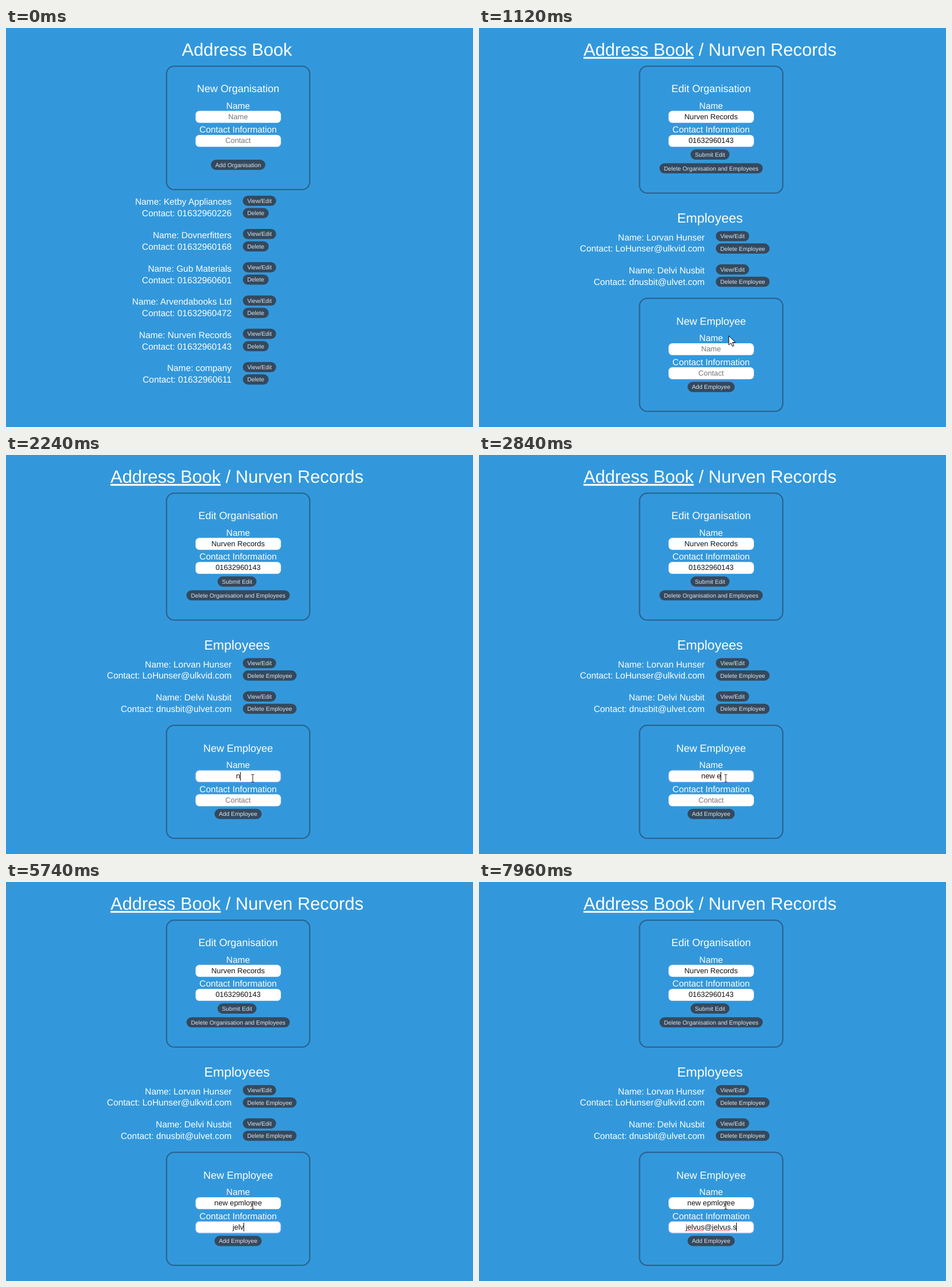
Animation, 810 px wide and 691 px high, one loop 8000 ms. Source, as an HTML page:

```html
<!DOCTYPE html>
<html lang="en">
<head>
<meta charset="utf-8">
<title>Address Book</title>
<style>
  html, body { margin: 0; width: 100%; height: 100%; overflow: hidden; background: #3398db; }
  svg { display: block; }
  text {
    font-family: "Liberation Sans", Arial, sans-serif;
    text-rendering: geometricPrecision;
    white-space: pre;
    fill: #fff;
  }
  .status { font-family: "Open Sans", sans-serif; fill: #a9abae; }
</style>
</head>
<body>
<svg width="810" height="691" viewBox="0 0 810 691">
  <g id="list"></g>
  <g id="detail"></g>
  <g id="live"></g>
  <g id="cursor"></g>
</svg>
<script>
const LOOP = 8000, OPEN = 900, FOCUS_NAME = 1550, FOCUS_CONTACT = 4660;
const MID = 402.6, FORM_Y = 402.3;
const INPUT = 12.8, BODY = 15.36, BUTTON = 10.24;
const $ = id => document.getElementById(id);
const pen = document.createElement('canvas').getContext('2d');

function width(str, size) {
  pen.font = `${size}px "Liberation Sans", Arial, sans-serif`;
  pen.textRendering = 'geometricPrecision';
  return pen.measureText(str).width;
}

const text = (str, x, y, size, anchor = 'middle', fill = '#fff') =>
  `<text x="${x}" y="${y}" font-size="${size}" text-anchor="${anchor}" style="fill:${fill}">${str}</text>`;

// y is the middle of the button
function button(label, x, y) {
  const w = width(label, BUTTON) + 15.36;
  return `<rect x="${x}" y="${y - 8.8}" width="${w}" height="17.6" rx="8.8" fill="#34495e"/>` +
    text(label, x + w / 2, y + 3.6, BUTTON, 'middle', '#dfe3e6');
}

const midButton = (label, x, y) =>
  button(label, x - width(label, BUTTON) / 2 - 7.68, y);

const panel = (top, bottom) =>
  `<rect x="278.4" y="${top + 1.1}" width="248.5" height="${bottom - top - 2.2}" rx="13.5" fill="none" stroke="#2a6594" stroke-width="2.3"/>`;

function field(value, y, fill = '#111', focused = false) {
  const ring = focused ? ' stroke="#79a7f5" stroke-width="1.2"' : '';
  return `<rect x="328.8" y="${y}" width="148" height="20.6" rx="6.5" fill="#fff"${ring}/>` +
    text(value, MID, y + 14, INPUT, 'middle', fill);
}

const labels = (title, y) =>
  text(title, MID, y + 111.3, 17.97) +
  text('Name', MID, y + 139.6, BODY) +
  text('Contact Information', MID, y + 181.2, BODY);

const entry = (name, contact, y, gap, remove) =>
  text('Name: ' + name, 391.3, y, BODY, 'end') +
  text('Contact: ' + contact, 391.3, y + gap, BODY, 'end') +
  button('View/Edit', 410.7, y - 7.2) +
  button(remove, 410.7, y + 14.2);

const companies = [
  ['Ketby Appliances', '01632960226'],
  ['Dovnerfitters', '01632960168'],
  ['Gub Materials', '01632960601'],
  ['Arvendabooks Ltd', '01632960472'],
  ['Nurven Records', '01632960143'],
  ['company', '01632960611']
];
const staff = [
  ['Lorvan Hunser', 'LoHunser@ulkvid.com'],
  ['Delvi Nusbit', 'dnusbit@ulvet.com']
];
const [orgName, orgPhone] = companies[4];

$('list').innerHTML =
  text('Address Book', 400.6, 48.2, 30.72) +
  panel(65, 281) + labels('New Organisation', 0) +
  field('Name', 143.6, '#757575') + field('Contact', 185.2, '#757575') +
  midButton('Add Organisation', MID, 236.9) +
  companies.map(([n, c], i) => entry(n, c, 306.4 + i * 57.6, 20, 'Delete')).join('');

$('detail').innerHTML =
  text(`<tspan text-decoration="underline">Address Book</tspan> / ${orgName}`, 400.6, 48.2, 30.72) +
  panel(65, 287) + labels('Edit Organisation', 0) +
  field(orgName, 143.6) + field(orgPhone, 185.2) +
  midButton('Submit Edit', 400.7, 219.1) +
  midButton('Delete Organisation and Employees', MID, 243) +
  text('Employees', 400.6, 337.2, 23.04) +
  staff.map(([n, c], i) => entry(n, c, 367.7 + i * 57.6, 19.4, 'Delete Employee')).join('') +
  panel(467, 665) + labels('New Employee', FORM_Y) +
  midButton('Add Employee', MID, 621.6);

const nameField = {
  hint: 'Name', y: 546, focus: FOCUS_NAME, blur: FOCUS_CONTACT, value: 'new epmloyee',
  keys: [2240, 2340, 2440, 2530, 2840, 2940, 3230, 3650, 3820, 4070, 4320, 4450]
};
const contactField = {
  hint: 'Contact', y: 587.6, focus: FOCUS_CONTACT, blur: LOOP, value: 'jelvus@jelvus.s',
  keys: [5290, 5540, 5640, 5740, 5890, 5940, 6090, 6340, 6500, 6580, 6650, 6830, 6880, 7080, 7960],
  erase: [7570, 7760], spelling: [[0, 6, 6090], [7, 13, 7080]]
};

function typed(f, t) {
  const [from, to] = f.erase || [LOOP, LOOP];
  let count = f.keys.filter(k => k <= t).length;
  if (t >= from && t < to) count--;
  const value = f.value.slice(0, count);
  const focused = t >= f.focus && t < f.blur;
  let out = field(value || f.hint, f.y, value ? '#111' : '#757575', focused);
  if (!focused) return out;

  const w = width(value, INPUT), left = MID - w / 2;
  for (const [a, b, since] of f.spelling || []) if (t >= since) {
    const x = left + width(value.slice(0, a), INPUT);
    const end = left + width(value.slice(0, b), INPUT);
    let d = `M${x} ${f.y + 16.8}`;
    for (let i = 1; x + i * 1.5 < end; i++) d += `L${x + i * 1.5} ${f.y + (i % 2 ? 15.6 : 16.8)}`;
    out += `<path d="${d}" fill="none" stroke="#f03a3a"/>`;
  }
  // the caret restarts its blink at every change
  const last = Math.max(...[f.focus, from, to, ...f.keys].filter(k => k <= t));
  if ((t - last) % 1020 < 510)
    out += `<rect x="${Math.round(left + w - .4)}" y="${Math.round(f.y + 2.8)}" width="1" height="15" fill="#000"/>`;
  return out;
}

const status = `<path d="M0 691V681H259Q262 681 262 684V691Z" fill="#35363a"/>
  <text class="status" x="-4" y="692.4" font-size="9.4">book.example:80/organisation?id=7be94d1a0c35f8e26</text>`;

const outline = 'fill="#fff" stroke="#000" stroke-linejoin="round"';
const shapes = {
  arrow: `<path d="M0 0V16L3.8 12.5L6.3 18.2L8.8 17.1L6.4 11.5H11.5Z" ${outline}/>`,
  hand: `<path d="M-1.2 1Q0-.6 1.2 1V6Q2.6 5 3.7 6.6Q5 5.8 6 7.4Q7.8 7 7.8 9V12Q7.8 14 6.5 17.2H-.5Q-1 15.2-2 14L-4.6 10.6Q-4.6 8.6-2.7 9.2L-1.2 10.8Z" ${outline}/>`,
  beam: `<path d="M-2.5-6.5H-.5L0-6L.5-6.5H2.5M0-6V6M-2.5 6.5H-.5L0 6L.5 6.5H2.5" fill="none" stroke="#333" stroke-width="1.1"/>`
};

const clamp = v => Math.min(1, Math.max(0, v));
const mix = (a, b, k) => a + (b - a) * k;

function pointer(t) {
  if (t < 80) return '';
  const arrive = 1 - (1 - clamp((t - 60) / 470)) ** 2;
  const move = clamp((t - OPEN) / 620);
  const glide = move * move * (3 - 2 * move);
  const x = mix(mix(704, 435.4, arrive), 428, glide);
  const y = mix(mix(662, 522, arrive), 560, glide);
  const kind = t < OPEN ? (x < 468 && y < 538 ? 'hand' : 'arrow') : (y > 546 ? 'beam' : 'arrow');
  return `<g transform="translate(${x} ${y})">${shapes[kind]}</g>`;
}

function draw() {
  const t = performance.now() % LOOP, opened = t >= OPEN;
  $('list').style.display = opened ? 'none' : '';
  $('detail').style.display = opened ? '' : 'none';
  $('live').innerHTML = opened ? typed(nameField, t) + typed(contactField, t)
    : t >= 720 ? `<g opacity="${t < 750 ? .5 : 1}">${status}</g>` : '';
  $('cursor').innerHTML = pointer(t);
  requestAnimationFrame(draw);
}
draw();
</script>
</body>
</html>
```
